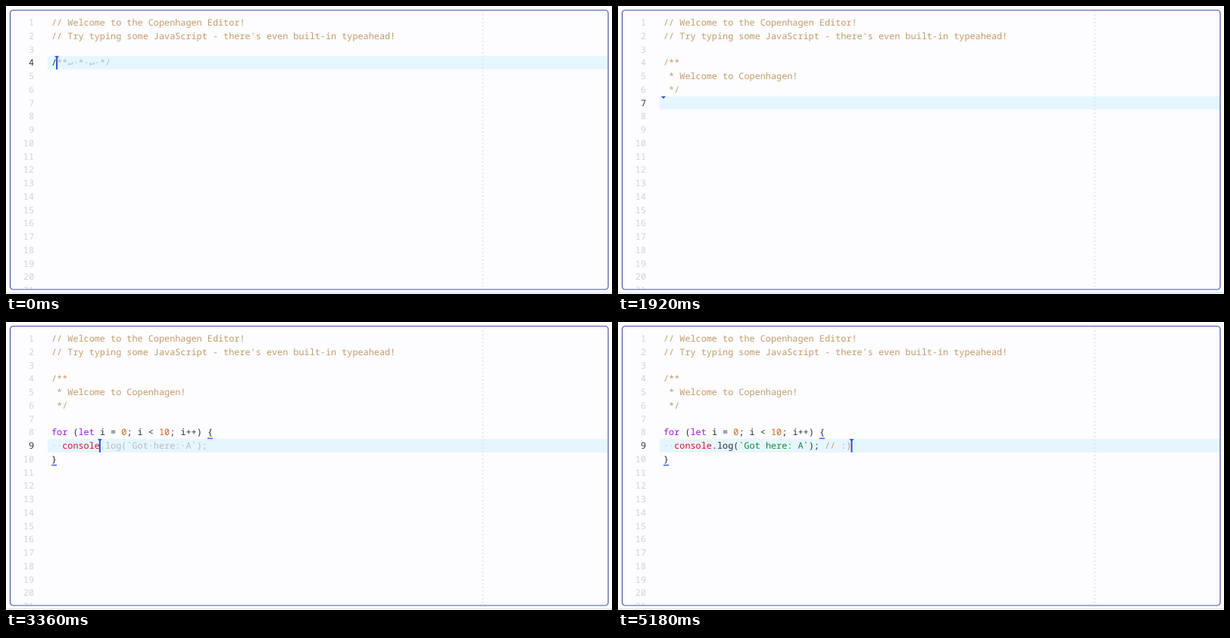
These frames come from a looping animation (800x382 px, 5200 ms). An HTML page:

```html
<!DOCTYPE html>
<html lang="en">
<head>
<meta charset="utf-8">
<title>Code editor typeahead</title>
<style>
  html, body { margin: 0; width: 100%; height: 100%; overflow: hidden; background: #fff; }
  svg { display: block; width: 800px; height: 382px; }
  text {
    font: 11.83px "Noto Sans Mono", "DejaVu Sans Mono", monospace;
    white-space: pre; text-rendering: geometricPrecision; fill: #2e3036;
  }
  .num { text-anchor: end; fill: #d3d2d8; }
  .num.on { fill: #34363c; }
  .comment { fill: #c19d6c; }
  .keyword { fill: #9c1fe0; }
  .number { fill: #c9671f; }
  .global { fill: #d2122e; }
  .string { fill: #128a3c; }
  .ghost { fill: #b4bbc2; }
  .indent { fill: #b3d4e0; }
</style>
</head>
<body>
<svg viewBox="0 0 800 382">
  <path d="M0 380.5H800" stroke="#dcdbe0"/>
  <rect x="5.5" y="5.5" width="789.5" height="370.5" rx="4" fill="#fdfcfe"/>
  <clipPath id="inside"><rect x="6" y="6" width="788.5" height="369.5" rx="4"/></clipPath>
  <g clip-path="url(#inside)">
    <rect id="active" x="55" width="740" height="17.75" fill="#e6f6fe"/>
    <path d="M629.5 6V376" stroke="#d9d8e0" stroke-dasharray="2 3"/>
    <g id="lines"></g>
  </g>
  <g id="caret" fill="#3350d2">
    <rect id="bar" x="-1" width="2" height="17.75"/>
    <path d="M-3.2 0H3.2L0 3.2Z"/>
  </g>
  <rect x="5.5" y="5.5" width="789.5" height="370.5" rx="4" fill="none" stroke="#4658a4" stroke-width="1.2"/>
</svg>
<script>
const LOOP = 5200, LINE = 17.75, CHAR = 11.83 * 0.6, LEFT = 60, BLINK = 235;
const $ = id => document.getElementById(id);

const header = "// Welcome to the Copenhagen Editor!\n" +
  "// Try typing some JavaScript - there's even built-in typeahead!\n\n";
const note = '/**\n * Welcome to Copenhagen!\n */';
const loop = note + '\n\nfor (let i = 0; i < 10; i++)';
const log = '  console.log(`Got here: A`);';

// Each step is [time, text]; "|" is the caret and «...» a suggestion.
const steps = [];
const at = (time, text) => steps.push([time, header + text]);
const type = (start, gap, before, word, after = '') => {
  for (let i = 1; i <= word.length; i++)
    at(start + (i - 1) * gap, before + word.slice(0, i) + '|' + after);
};

at(0, '/|«**↵·*·↵·*/»');
at(180, '/**\n * |\n */');
type(370, 48, '/**\n * ', 'Welcome to Copenhagen!', '\n */');
at(1540, note + '|');
at(1670, note + '\n|');
at(1970, note + '\n\n|');
type(2060, 50, note + '\n\n', 'fo');
at(2160, note + '\n\nfor|« (let·i·=·0;·i·<·10;·i++)·{}»');
at(2300, loop.replace('= 0', '= 0|') + '«·{}»');
at(2450, loop.replace('10', '10|') + '«·{}»');
at(2720, loop + '|«·{}»');
at(2880, loop + ' {|}');
at(3020, loop + ' {\n  |\n}');
type(3080, 42, loop + ' {\n  ', 'consol', '\n}');
at(3334, loop + ' {\n  console|«.log(`Got·here:·A`);»\n}');
at(3540, loop + ' {\n' + log.replace('A`', 'A|`') + '\n}');
at(3760, loop + ' {\n' + log.replace('A`', 'A`|') + '\n}');
at(3900, loop + ' {\n' + log.replace(';', '|;') + '\n}');
at(4140, loop + ' {\n' + log + '|\n}');
type(4410, 110, loop + ' {\n' + log, ' // :)', '\n}');

const escape = s => s.replace(/&/g, '&amp;').replace(/</g, '&lt;');
const span = (kind, s) => `<tspan class="${kind}">${escape(s)}</tspan>`;
const kinds = ['comment', 'ghost', 'string', 'keyword', 'number', 'global'];
const tokens = /(\/\/.*|^\/\*\*$|^ \*.*)|(«.*»)|(`[^`]*`?)|\b(for|let)\b|\b(\d+)\b|\b(console)\b|[^]/g;

function highlight(line) {
  return line.replace(tokens, (token, ...groups) => {
    const kind = kinds.find((_, i) => groups[i] !== undefined);
    return kind ? span(kind, token.replace(/[«»]/g, '')) : escape(token);
  });
}

// Innermost bracket pair around the caret, including one just closed.
function matchPair(code, caret) {
  const open = [], pairs = [];
  [...code].forEach((c, i) => {
    if ('({'.includes(c)) open.push(i);
    if (')}'.includes(c) && open.length) pairs.push([open.pop(), i]);
  });
  return pairs.filter(([a, b]) => a < caret && b >= caret - 1)
    .sort((p, q) => q[0] - p[0])[0] || [];
}

function place(text, index) {
  const before = text.slice(0, index).split('\n');
  return { row: before.length - 1, col: before.pop().length };
}
const xOf = col => LEFT + col * CHAR;
const topOf = row => 13.2 + row * LINE;

function drawText(marked) {
  const caret = marked.indexOf('|');
  const text = marked.replace('|', '');
  const { row, col } = place(text, caret);
  const rows = text.split('\n');
  let out = '';
  for (let i = 0; i < 21; i++) {
    const y = topOf(i) + 12.8, line = rows[i] || '';
    out += `<text class="num${i === row ? ' on' : ''}" x="37" y="${y}">${i + 1}</text>`;
    if (i === row && line.startsWith('  ')) out += `<text class="indent" x="${LEFT}" y="${y}">··</text>`;
    if (line) out += `<text x="${LEFT}" y="${y}">${highlight(line)}</text>`;
  }
  const code = text.replace(/«.*»|\/\/.*/g, s => ' '.repeat(s.length));
  for (const index of matchPair(code, caret)) {
    const p = place(text, index);
    out += `<rect x="${xOf(p.col)}" y="${topOf(p.row) + 16.2}" width="${CHAR}" height="1.5" fill="#3c68e0"/>`;
  }
  $('lines').innerHTML = out;
  $('active').setAttribute('y', topOf(row));
  $('caret').setAttribute('transform', `translate(${xOf(col)} ${topOf(row)})`);
}

let shown;
function render(time) {
  const step = steps.filter(s => s[0] <= time).pop();
  if (step !== shown) drawText((shown = step)[1]);
  const visible = (time - step[0]) % (2 * BLINK) < BLINK;
  $('bar').setAttribute('visibility', visible ? 'visible' : 'hidden');
}

const start = performance.now();
function tick() {
  render((performance.now() - start) % LOOP);
  requestAnimationFrame(tick);
}
tick();
</script>
</body>
</html>
```
